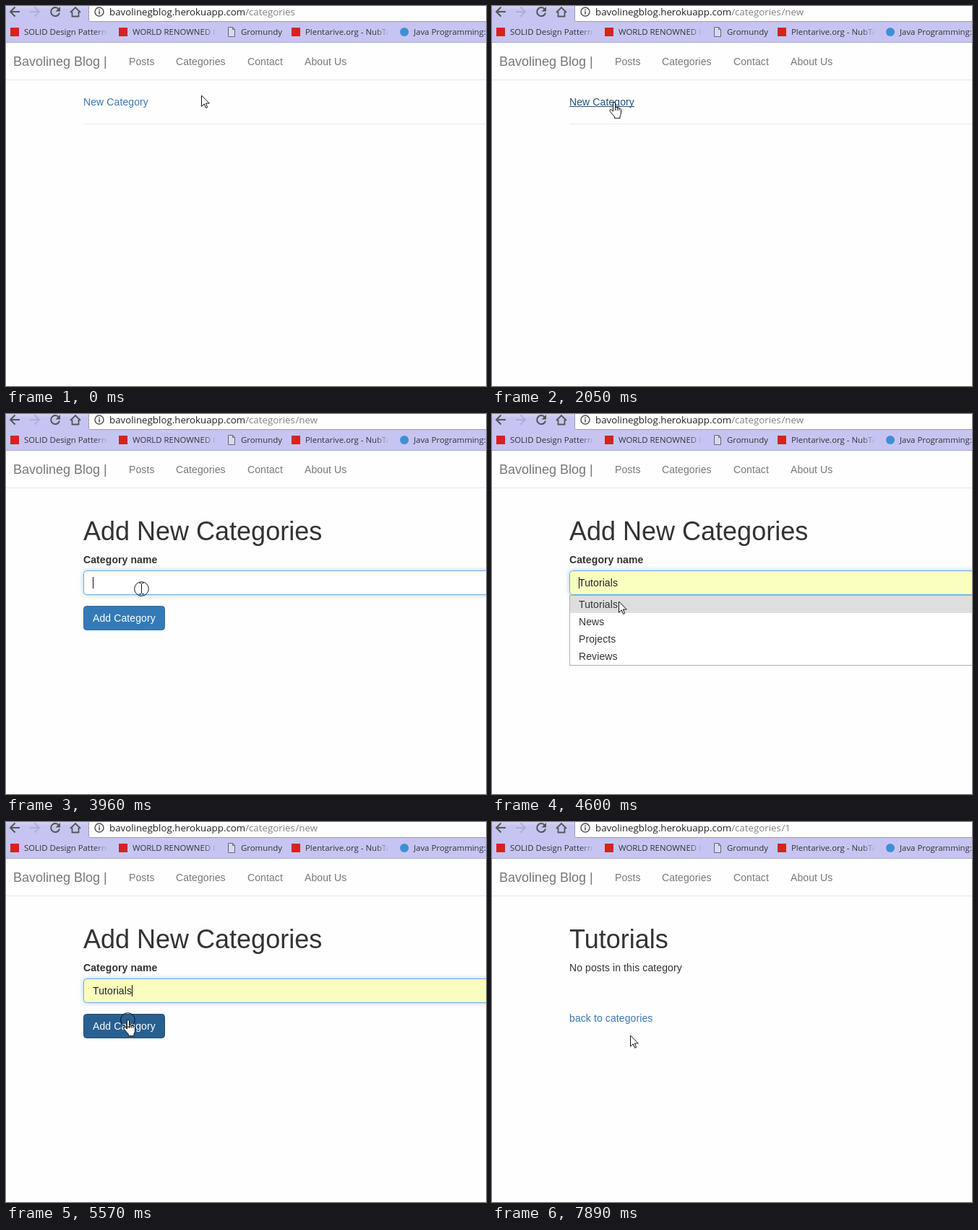
Write an HTML page that moves like this. It is 664 px wide and 527 px high and loops after 8000 ms.

```html
<!DOCTYPE html>
<html lang="en">
<head>
<meta charset="utf-8">
<title>Adding a blog category</title>
<style>
html, body { margin: 0; width: 100%; height: 100%; overflow: hidden; background: #fefefe; }
#stage { position: absolute; left: 0; top: 0; width: 664px; height: 527px; overflow: hidden; }
svg { display: block; }
text { white-space: pre; }
.page { font: 14px "Liberation Sans", Arial, sans-serif; letter-spacing: .1px; fill: #333; }
.nav { fill: #777; }
.brand { font-size: 18px; letter-spacing: 0; }
.title { font-size: 36px; letter-spacing: 0; }
.label { font-weight: bold; }
.link { fill: #3a76b0; }
.bar { font: 11.4px "Open Sans", "Noto Sans", sans-serif; fill: #333; }
.url { font-size: 13.3px; fill: #222; }
.path { fill: #808080; }
.icon { fill: none; stroke: #555; stroke-width: 2; }

/* Every part switches hard on a shared 8 s clock. */
.step { animation: 8s step-end infinite; }
#list { animation-name: list; }
#form { animation-name: form; }
#result { animation-name: result; }
#navHover { animation-name: navHover; }
#newLink { animation-name: newLink; }
#newLine { animation-name: newLine; }
#urlNew { animation-name: urlNew; }
#urlOne { animation-name: urlOne; }
#reload { animation-name: reload; }
#stop { animation-name: stop; }
#field { animation-name: field; stroke: #ccc; fill: #fff; }
#value { animation-name: value; fill: #222; }
#caret { animation-name: caret; }
#menu { animation-name: menu; }
#row { animation-name: row; }
#button { animation-name: button; fill: #337ab7; stroke: #2e6da4; }
#outline { animation-name: outline; }
#cursor { animation-name: cursor; }
#ring { animation-name: ring; }

@keyframes list { 0% { opacity: 1 } 32.25% { opacity: 0 } }
@keyframes form { 0% { opacity: 0 } 32.25% { opacity: 1 } 90.125% { opacity: 0 } }
@keyframes result { 0% { opacity: 0 } 90.125% { opacity: 1 } }
@keyframes navHover { 0% { fill: #777 } 3.375% { fill: #333 } 19.125% { fill: #777 } }
@keyframes newLink { 0% { fill: #3a76b0 } 20.75% { fill: #23527c } }
@keyframes newLine { 0% { opacity: 0 } 20.75% { opacity: 1 } }
@keyframes urlNew { 0% { opacity: 0 } 25.625% { opacity: 1 } 79.5% { opacity: 0 } }
@keyframes urlOne { 0% { opacity: 0 } 79.5% { opacity: 1 } }
@keyframes reload { 0% { opacity: 1 } 71.125% { opacity: 0 } 90.125% { opacity: 1 } }
@keyframes stop { 0% { opacity: 0 } 71.125% { opacity: 1 } 90.125% { opacity: 0 } }
@keyframes field {
  0% { stroke: #ccc; fill: #fff; filter: none }
  49.5% { stroke: #66afe9; fill: #fff; filter: drop-shadow(0 0 3px rgba(102,175,233,.6)) }
  56% { stroke: #66afe9; fill: #faffbd; filter: drop-shadow(0 0 3px rgba(102,175,233,.6)) }
  71.125% { stroke: #ccc; fill: #faffbd; filter: none }
}
@keyframes value { 0% { opacity: 0 } 56% { opacity: 1 } }
@keyframes caret {
  0% { opacity: 0; transform: none }
  47.625% { opacity: 1; transform: none }
  62.375% { opacity: 1; transform: translateX(54px) }
  71.125% { opacity: 0; transform: none }
}
@keyframes menu { 0% { opacity: 0 } 51% { opacity: 1 } 62.375% { opacity: 0 } }
@keyframes row { 0% { opacity: 0 } 56% { opacity: 1 } }
@keyframes button {
  0% { fill: #337ab7; stroke: #2e6da4 }
  39.125% { fill: #286090; stroke: #204d74 }
  42.25% { fill: #337ab7; stroke: #2e6da4 }
  67.75% { fill: #286090; stroke: #204d74 }
}
@keyframes outline { 0% { opacity: 0 } 71.125% { opacity: 1 } }

/* --shape picks a cell of the sheet: 0 arrow, 1 hand, 2 text beam. */
#cursor { position: absolute; left: -12px; top: -12px; width: 40px; height: 40px; overflow: hidden; }
#sheet { transform: translateX(calc(var(--shape) * -40px)); }
#ring { position: absolute; left: 0; top: 0; }
@keyframes cursor {
  0% { transform: translate(270px, 123px); --shape: 0 }
  1.875% { transform: translate(254px, 102px); --shape: 0 }
  3.375% { transform: translate(244px, 88px); --shape: 1 }
  19.125% { transform: translate(201px, 112px); --shape: 0 }
  20.75% { transform: translate(166px, 130px); --shape: 1 }
  22.625% { transform: translate(168px, 133px); --shape: 1 }
  32.25% { transform: translate(168px, 133px); --shape: 2 }
  37.625% { transform: translate(190px, 227px); --shape: 2 }
  39.125% { transform: translate(196px, 268px); --shape: 1 }
  42.25% { transform: translate(187px, 242px); --shape: 2 }
  54.5% { transform: translate(184px, 246px); --shape: 2 }
  56% { transform: translate(180px, 253px); --shape: 0 }
  57.5% { transform: translate(175px, 259px); --shape: 0 }
  59% { transform: translate(173px, 262px); --shape: 0 }
  67.75% { transform: translate(168px, 274px); --shape: 1 }
  76.125% { transform: translate(169px, 273px); --shape: 1 }
  90.125% { transform: translate(179px, 282px); --shape: 0 }
  95.5% { transform: translate(190px, 296px); --shape: 0 }
  98.625% { transform: translate(191px, 295px); --shape: 0 }
}
@keyframes ring {
  0% { opacity: 0 }
  11.875% { opacity: 1 } 13.75% { opacity: 0 }
  24.125% { opacity: 1 } 25.625% { opacity: 0 }
  47.625% { opacity: 1 } 51% { opacity: 0 }
  60.875% { opacity: 1 } 62.375% { opacity: 0 }
  69.625% { opacity: 1 } 71.125% { opacity: 0 }
}
</style>
</head>
<body>
<div id="stage">
<svg width="664" height="527" viewBox="0 0 664 527">
  <defs>
    <linearGradient id="top" x2="0" y2="1">
      <stop stop-color="#d6d5f7"/><stop offset="1" stop-color="#c6c5f2"/>
    </linearGradient>
    <linearGradient id="fade">
      <stop stop-color="#c6c5f2" stop-opacity="0"/><stop offset=".65" stop-color="#c6c5f2"/>
    </linearGradient>
  </defs>
  <rect width="664" height="527" fill="#fefefe"/>

  <!-- browser bar -->
  <g class="bar">
    <rect width="664" height="50" fill="#c6c5f2"/>
    <rect width="114" height="5" fill="url(#top)"/>
    <rect y="50" width="664" height="1" fill="#aeadc4"/>
    <path d="M114.5-1V19.5q0 2 2 2H665V-1Z" fill="#fefefe" stroke="#9a99bd"/>
    <path class="icon" d="M19 8H6.5M12.5 1.5L6 8L12.5 14.5"/>
    <path class="icon" d="M33 8H45.5M39.5 1.5L46 8L39.5 14.5" style="stroke:#b0aed8"/>
    <g id="reload" class="step">
      <path class="icon" d="M73 4.5A6 6 0 1 0 74 9.5"/>
      <path d="M75 1V7.5H68.5Z" fill="#555"/>
    </g>
    <path id="stop" class="icon step" d="M62.5 2.5L73.5 13.5M73.5 2.5L62.5 13.5"/>
    <path class="icon" d="M89 9L96 2L103 9M91.5 8V14.5H100.5V8" style="stroke-width:1.8"/>
    <circle class="icon" cx="129" cy="8" r="6" style="stroke-width:1.5"/>
    <path d="M128.2 4.5h1.7v1.7h-1.7ZM128.2 7.2h1.7v4.3h-1.7Z" fill="#555"/>
    <text class="url" x="143" y="13">bavolinegblog.herokuapp.com<tspan class="path">/categories</tspan></text>
    <text id="urlNew" class="url path step" x="400.4" y="13">/new</text>
    <text id="urlOne" class="url path step" x="400.4" y="13">/1</text>

    <text x="25" y="40">SOLID Design Patterns</text>
    <rect x="122" y="24" width="30" height="24" fill="url(#fade)"/>
    <text x="175" y="40">WORLD RENOWNED IN</text>
    <rect x="272" y="24" width="30" height="24" fill="url(#fade)"/>
    <text x="325" y="40">Gromundy</text>
    <text x="414" y="40">Plentarive.org - NubTa</text>
    <rect x="511" y="24" width="30" height="24" fill="url(#fade)"/>
    <text x="564" y="40">Java Programming: A</text>
    <g fill="#d8221f">
      <rect x="6" y="30" width="12" height="12"/>
      <rect x="156" y="30" width="12" height="12"/>
      <rect x="395" y="30" width="12" height="12"/>
    </g>
    <circle cx="551" cy="36" r="6" fill="#3f8fd6"/>
    <path d="M307.5 29.5H313.5L316.5 32.5V42.5H307.5ZM313.5 29.5V32.5H316.5" fill="#d9d8f5" stroke="#666"/>
  </g>

  <g class="page">
    <rect y="102" width="664" height="1" fill="#e7e7e7"/>
    <g class="nav">
      <text class="brand" x="10" y="83">Bavolineg Blog |</text>
      <text x="170" y="82">Posts</text>
      <text id="navHover" class="step" x="235" y="82">Categories</text>
      <text x="334" y="82">Contact</text>
      <text x="413" y="82">About Us</text>
    </g>

    <g id="list" class="step">
      <text id="newLink" class="link step" x="107" y="138">New Category</text>
      <rect id="newLine" class="step" x="107" y="139" width="90" height="1" fill="#23527c"/>
      <rect x="107" y="163" width="557" height="1" fill="#eaeaea"/>
    </g>

    <g id="form" class="step">
      <text class="title" x="107" y="175">Add New Categories</text>
      <text class="label" x="107" y="207">Category name</text>
      <rect id="field" class="step" x="107.5" y="217.5" width="600" height="33" rx="4"/>
      <text id="value" class="step" x="120" y="239">Tutorials</text>
      <rect id="caret" class="step" x="120" y="226" width="1" height="16" fill="#111"/>
      <rect id="outline" class="step" x="106.5" y="265.5" width="114" height="35" rx="4" fill="none" stroke="#7fa9ee" stroke-width="2"/>
      <rect id="button" class="step" x="107.5" y="266.5" width="112" height="33" rx="4"/>
      <text x="120" y="288" fill="#fff">Add Category</text>
      <g id="menu" class="step">
        <rect x="107.5" y="251.5" width="600" height="97" fill="#fff" stroke="#b0b0b0"/>
        <rect id="row" class="step" x="108" y="252" width="600" height="24" fill="#dedede"/>
        <text x="120" y="269">Tutorials</text>
        <text x="120" y="293">News</text>
        <text x="120" y="317">Projects</text>
        <text x="120" y="341">Reviews</text>
      </g>
    </g>

    <g id="result" class="step">
      <text class="title" x="107" y="175">Tutorials</text>
      <text x="107" y="207">No posts in this category</text>
      <text class="link" x="107" y="277">back to categories</text>
    </g>
  </g>
</svg>

<div id="cursor" class="step">
  <svg id="sheet" width="120" height="40" fill="#fff" stroke="#111">
    <path transform="translate(12 12)" d="M.5 1V16.3L4.2 12.8L6.6 18.4L8.7 17.5L6.4 12H11.3Z"/>
    <path transform="translate(46 12)" stroke-linejoin="round" d="M5.5 13V2a1.5 1.5 0 0 1 3 0V7.5q2.2-1 2.7.8q2.2-.8 2.7.8q2.1-.6 2.6 1.2V15q0 2.5-1.5 5v2.7H7.5V20.5L1.5 13.5q-1.500-2 0-2.800q1.700-.5 4 2.300M8.500 7.500V12M11.200 8.300V12M13.900 9.100V12"/>
    <path transform="translate(92 12)" fill="none" d="M-2.500-7.500H-.5L.5-6.500L1.500-7.500H3.500M.5-6.500V6.500M-2.500 7.500H-.5L.5 6.500L1.500 7.500H3.500"/>
  </svg>
  <svg id="ring" class="step" width="40" height="40" fill="none" stroke="#111">
    <circle cx="12.5" cy="12.5" r="9.8"/>
  </svg>
</div>
</div>
</body>
</html>
```
